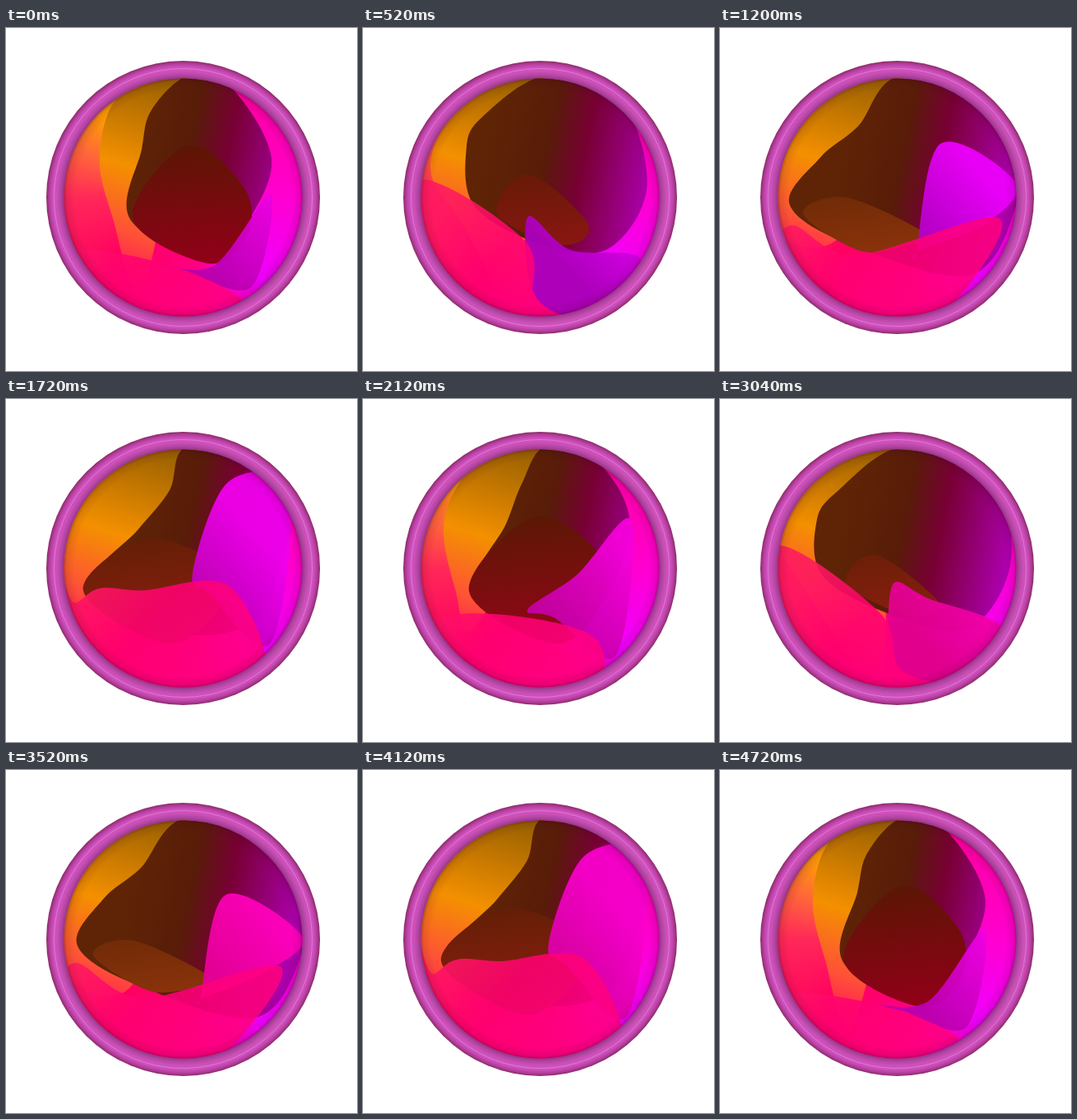
An HTML page with a canvas for the animation above (4760 ms loop, 427 by 418 pixels).

```html
<!DOCTYPE html>
<html>
<head>
<meta charset="utf-8">
<style>
html, body { margin: 0; width: 100%; height: 100%; overflow: hidden; background: #fff; }
canvas { display: block; }
</style>
</head>
<body>
<canvas id="stage" width="427" height="418"></canvas>
<script>
const ctx = document.getElementById('stage').getContext('2d');
const LOOP = 4760, SWIRL = LOOP / 2, CX = 215.5, CY = 206.5, TAU = Math.PI * 2;

// Every key point swings harmonically; c, s and k are the waves of one swirl.
const folds = {
  amber: (c, s, k) => [
    [235, 58], [133 + 8 * c, 80], [82 + 23 * c + 4 * s + 9 * k, 155 + 10 * s],
    [98 + 32 * c + 16 * s, 239 - 7 * c], [152 + 12 * c + 43 * s, 292 + 30 * c + 55 * s], [205, 150]
  ],
  dusk: (c, s) => [
    [222, 58], [320 - 45 * c, 86 - 12 * c], [345 - 22 * c + 5 * s, 176 - 17 * c + 20 * s],
    [300 - 8 * c, 270 - 30 * c + 5 * s], [205 + 45 * c + 5 * s, 274 + 10 * c - 12 * s],
    [118 + 33 * c + 12 * s, 224 + 9 * c - 8 * s], [143 + 22 * c - 22 * s, 153 - 5 * c - 5 * s],
    [172 + 5 * c - 28 * s, 110 - 10 * c]
  ],
  core: (c, s) => [
    [187 + 33 * c + 8 * s, 175 - 32 * c + 10 * s], [270 + 18 * c - 3 * s, 222 - 30 * c + 18 * s],
    [262 + 33 * c - 5 * s, 257 - 8 * c + 5 * s], [209 + 38 * c + 8 * s, 279 + 8 * c - 20 * s],
    [128 + 26 * c + 30 * s, 229 + 3 * c - 5 * s]
  ],
  violet: (c, s, k) => [
    [214 - 25 * c - 9 * s, 250 + 7 * c + 8 * s + 31 * k], [261 - 7 * c - 8 * s, 200 + 73 * c + 72 * s + 16 * k],
    [341 - 19 * c, 197 + 6 * c + 85 * s], [311 - 12 * c - 9 * s, 302 + 38 * c + 22 * s - 25 * k],
    [231 - 11 * c - 16 * s, 285 + 13 * c + 45 * s]
  ],
  pink: (c, s, k) => [
    [84 - 18 * s, 232 + 15 * c - 29 * s + 23 * k], [182 + 17 * c + 12 * s, 264 + 6 * c + 12 * s + 19 * k],
    [274 - 27 * c - 30 * s + 38 * k, 281 + 48 * c + 45 * s], [264 - 12 * c - 49 * s, 342], [200, 365], [62, 310]
  ]
};

function gradient(g, stops) {
  stops.forEach(stop => g.addColorStop(...stop));
  return g;
}
const linear = (x0, y0, x1, y1, ...stops) => gradient(ctx.createLinearGradient(x0, y0, x1, y1), stops);
const radial = (r0, r1, ...stops) => gradient(ctx.createRadialGradient(CX, CY, r0, CX, CY, r1), stops);
const rgb = (...c) => `rgb(${c.map(Math.round)})`;

// Closed smooth curve through the points
function blob(points, fill, alpha = 1) {
  const n = points.length, at = i => points[(i + n) % n];
  const handle = (i, side) => at(i).map((v, a) => v + side * (at(i + 1)[a] - at(i - 1)[a]) / 6);
  ctx.beginPath();
  ctx.moveTo(...points[0]);
  for (let i = 0; i < n; i++)
    ctx.bezierCurveTo(...handle(i, 1), ...handle(i + 1, -1), ...at(i + 1));
  ctx.globalAlpha = alpha;
  ctx.fillStyle = fill;
  ctx.fill();
  ctx.globalAlpha = 1;
}

function circle(r) {
  ctx.beginPath();
  ctx.arc(CX, CY, r, 0, TAU);
}

function disc(r, fill) {
  circle(r);
  ctx.fillStyle = fill;
  ctx.fill();
}

const rim = gradient(ctx.createConicGradient(-Math.PI / 2, CX, CY), [
  [0, '#5a2000'], [.05, '#8a0040'], [.08, '#ff00a0'], [.25, '#ff00d0'], [.38, '#f000ff'],
  [.47, '#ff0080'], [.63, '#ff0060'], [.75, '#ff2858'], [.82, '#ff6838'], [.88, '#ffa000'],
  [.95, '#a87000'], [1, '#5a2000']]);
const amberFill = linear(200, 62, 120, 310, [0, '#986000'], [.45, '#f49000'], [.75, '#ff5038'], [1, '#ff0860']);
const duskFill = linear(150, 150, 350, 190, [0, '#5f2406'], [.35, '#581c08'], [.58, '#780034'], [1, '#ac00ac']);
const pinkFill = linear(90, 235, 220, 345, [0, '#ff1860'], [.5, '#ff0070'], [1, '#ff0080']);
const shade = radial(132, 146, [0, '#40002000'], [.7, '#4000201c'], [1, '#40002066']);
const ringFill = radial(144, 167, [0, '#8c3080'], [.2, '#b044a0'], [.42, '#cc50b8'],
  [.62, '#d052c0'], [.8, '#b840a2'], [1, '#862860']);

function draw(time) {
  const phase = TAU * time / SWIRL;
  const c = Math.cos(phase), s = Math.sin(phase), k = Math.cos(2 * phase);
  const shape = name => folds[name](c, s, k);
  const warm = .5 - .5 * Math.cos(TAU * (time - 900) / LOOP);

  ctx.fillStyle = '#fff';
  ctx.fillRect(0, 0, 427, 418);
  disc(166.5, ringFill);

  ctx.save();
  circle(145);
  ctx.clip();
  disc(146, rim);
  blob(shape('amber'), amberFill);
  blob(shape('dusk'), duskFill);
  blob(shape('core'), linear(200, 145, 215, 288,
    [0, rgb(92, 30 - 8 * c, 4)], [1, rgb(145, 26 - 26 * c, 18 + 6 * c)]));
  blob(shape('violet'), linear(320, 180, 225, 270,
    [0, rgb(235 + 20 * warm, 0, 255 - 70 * warm)],
    [1, rgb(165 + 60 * warm, 0, 190 - 50 * warm)]), .95);
  blob(shape('pink'), pinkFill, .88);
  disc(146, shade);
  ctx.restore();

  circle(157);
  ctx.strokeStyle = '#f0a0e480';
  ctx.lineWidth = 1;
  ctx.stroke();
}

function tick() {
  draw(Math.floor(performance.now() % LOOP / 40) * 40);
  requestAnimationFrame(tick);
}
tick();
</script>
</body>
</html>
```
